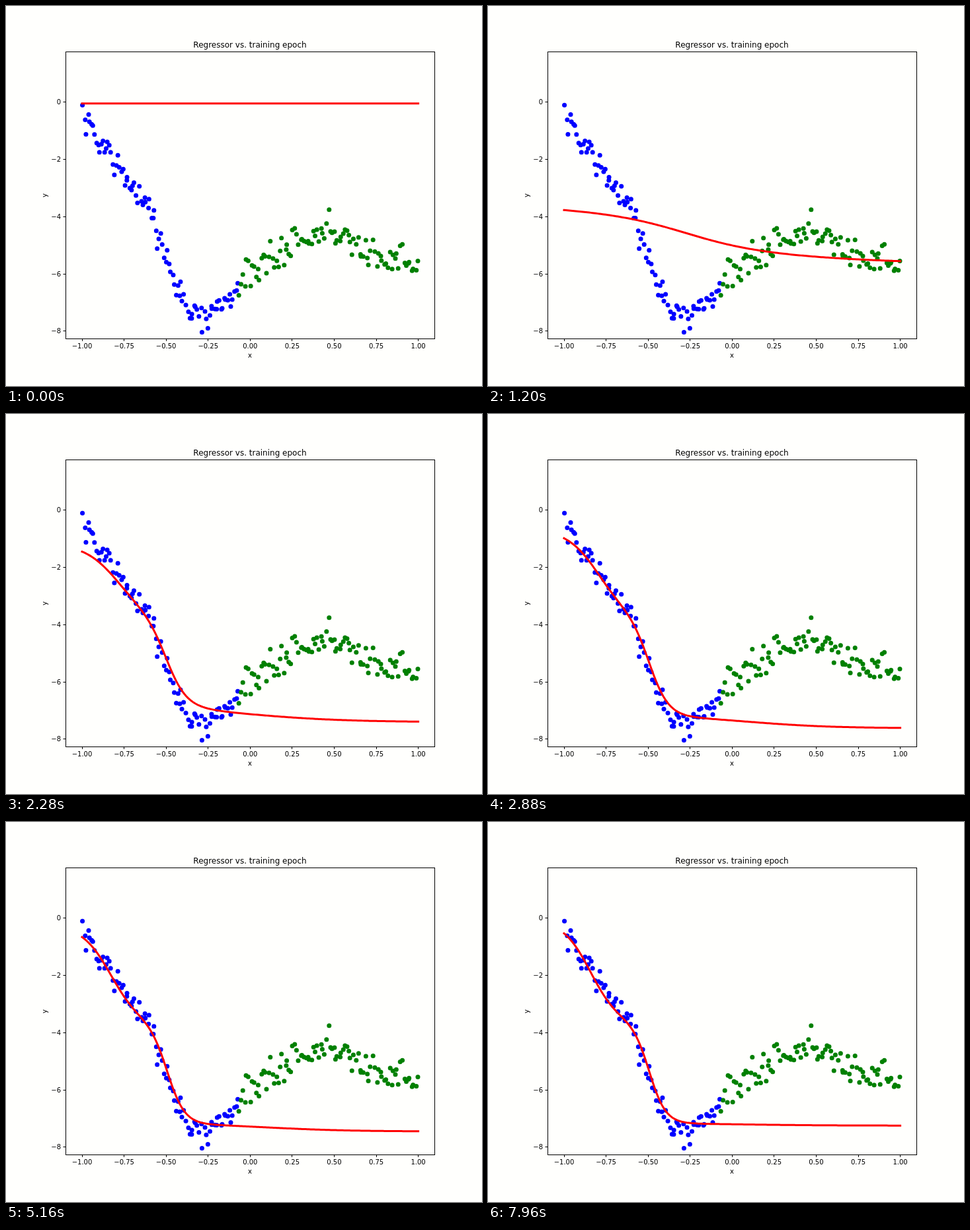
Recreate the animation shown at these times as an HTML page with a canvas. Size 720x576 px, loop 8000 ms.

```html
<!DOCTYPE html>
<html lang="en">
<head>
<meta charset="utf-8">
<title>Regressor vs. training epoch</title>
<style>
html, body { margin: 0; width: 100%; height: 100%; overflow: hidden; background: #fffffd; }
canvas { display: block; }
</style>
</head>
<body>
<canvas id="plot" width="720" height="576"></canvas>
<script>
const ctx = document.getElementById('plot').getContext('2d');
const LOOP = 8000, STEP = 40;
const BOX = { left: 90, top: 69, right: 648, bottom: 504 };

const toX = v => 369.3 + v * 254.3;
const toY = v => 145.6 - v * 43.4;
const mix = (a, b, u) => a + (b - a) * u;
const span = (t, from, to) => Math.min(1, Math.max(0, (t - from) / (to - from)));
const easeOut = u => 1 - (1 - u) ** 2;
const smooth = u => u * u * (3 - 2 * u);

// Trend of the samples as a few corner points
const TREND = [
  [-1, -0.4], [-0.75, -2.55], [-0.6, -3.8], [-0.4, -6.95], [-0.28, -7.6],
  [-0.12, -6.85], [-0.05, -6.1], [0.1, -5.55], [0.25, -5], [0.45, -4.3],
  [0.7, -5.2], [0.83, -5.55], [1, -5.7]
];

function trend(x) {
  const i = Math.max(1, TREND.findIndex(p => p[0] >= x));
  const [x0, y0] = TREND[i - 1], [x1, y1] = TREND[i];
  return mix(y0, y1, (x - x0) / (x1 - x0));
}

function seeded(seed) {
  return () => {
    seed = (seed * 1664525 + 1013904223) % 4294967296;
    return seed / 4294967296;
  };
}

// Noisy samples spread over [from, to]
function samples(from, to, count, noise, seed) {
  const rand = seeded(seed);
  return Array.from({ length: count }, (_, i) => {
    const x = mix(from, to, (i + rand()) / count);
    return [x, trend(x) + (rand() + rand() - 1) * noise];
  });
}

const blue = samples(-1, -0.07, 94, 0.6, 7);
const green = samples(-0.07, 1, 97, 0.75, 21);

// Early fit: a flat line that bends into one soft step
function earlyFit(x, t) {
  const level = mix(-0.05, -4.61, easeOut(span(t, 0, 640)));
  const k = smooth(span(t, 640, 1760));
  const tilt = 0.035 * x * span(t, 0, 640) * (1 - k);
  const center = -0.55 * k, width = mix(0.75, 0.153, k);
  return level + 0.06 * k - tilt - 1.56 * k * Math.atan((x - center) / width);
}

// Late fit: two steps that sharpen, and a tail that levels out
function lateFit(x, t) {
  const u = span(t, 2880, 7960), k = easeOut(u);
  const first = mix(1.5, 1.8, k) * (1 + Math.tanh((x + mix(0.8, 0.843, k)) / mix(0.185, 0.164, k)));
  const second = 1.75 * (1 + Math.tanh((x + 0.492) / mix(0.115, 0.098, k)));
  const tail = mix(0.45, 0.08, u) * (1 + Math.tanh((x - 0.1) / 0.5)) / 2;
  return mix(-0.67, -0.07, k) - first - second - tail;
}

const fit = (x, t) => mix(earlyFit(x, t), lateFit(x, t), easeOut(span(t, 1760, 2880)));

function dots(points, color) {
  ctx.fillStyle = color;
  for (const [x, y] of points) {
    ctx.beginPath();
    ctx.arc(toX(x), toY(y), 3.5, 0, 2 * Math.PI);
    ctx.fill();
  }
}

function label(text, x, y, align = 'center', size = 10) {
  ctx.font = size + 'px "DejaVu Sans", sans-serif';
  ctx.textAlign = align;
  ctx.fillText(text, x, y);
}

const signed = (v, digits) => (v < 0 ? '\u2212' : '') + Math.abs(v).toFixed(digits);

function axes() {
  const { left, top, right, bottom } = BOX;
  ctx.strokeStyle = ctx.fillStyle = '#000';
  ctx.lineWidth = 1;
  ctx.strokeRect(left + 0.5, top + 0.5, right - left, bottom - top);
  ctx.beginPath();
  for (let v = -1; v <= 1; v += 0.25) {
    const x = Math.floor(toX(v)) + 0.5;
    ctx.moveTo(x, bottom);
    ctx.lineTo(x, bottom + 4);
    label(signed(v, 2), toX(v), 519);
  }
  for (let v = 0; v >= -8; v -= 2) {
    const y = Math.floor(toY(v)) + 0.5;
    ctx.moveTo(left, y);
    ctx.lineTo(left - 3.5, y);
    label(signed(v, 0), 83, y + 3.5, 'right');
  }
  ctx.stroke();
  label('Regressor vs. training epoch', 369, 63, 'center', 12);
  label('x', 369, 533);
  ctx.save();
  ctx.translate(62, 287);
  ctx.rotate(-Math.PI / 2);
  label('y', 0, 0);
  ctx.restore();
}

function curve(t) {
  ctx.save();
  ctx.strokeStyle = '#f00';
  ctx.lineWidth = 3;
  ctx.lineCap = 'square';
  ctx.lineJoin = 'round';
  ctx.beginPath();
  for (let i = -100; i <= 100; i++) ctx.lineTo(toX(i / 100), toY(fit(i / 100, t)));
  ctx.stroke();
  ctx.restore();
}

function draw(now) {
  const t = Math.floor(now % LOOP / STEP) * STEP;
  ctx.fillStyle = '#fffffd';
  ctx.fillRect(0, 0, 720, 576);
  dots(blue, '#00f');
  dots(green, '#008000');
  axes();
  curve(t);
}

const start = performance.now();
function tick() {
  draw(performance.now() - start);
  requestAnimationFrame(tick);
}
tick();
</script>
</body>
</html>
```
